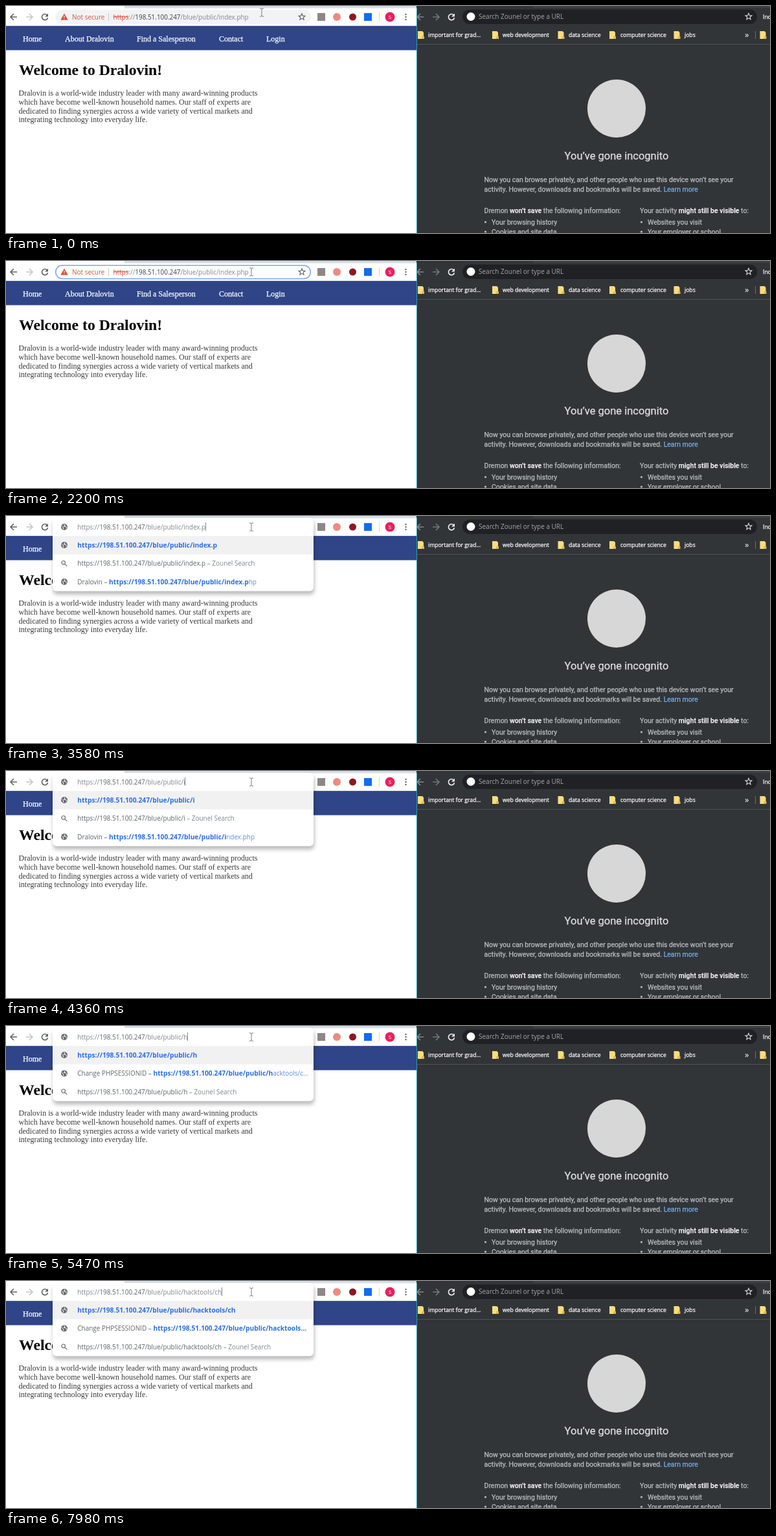
These frames come from a looping animation (1180x352 px, 8000 ms). An HTML page:

```html
<!DOCTYPE html>
<html lang="en">
<head>
<meta charset="utf-8">
<title>Two browser windows</title>
<style>
html, body { margin: 0; width: 100%; height: 100%; overflow: hidden; background: #fff; }
svg { display: block; width: 1180px; height: 352px; }
text { white-space: pre; stroke-width: 0; }
.ui { font-family: "Open Sans", "Noto Sans", sans-serif; }
.serif { font-family: "Liberation Serif", "Times New Roman", serif; }
.robo { font-family: Roboto, Arial, sans-serif; }
.firm { stroke-width: .25px; }
.line { fill: none; }
.panel { filter: drop-shadow(1.5px 5px 3px rgba(0, 0, 0, .28)); }
</style>
</head>
<body>
<svg id="stage" viewBox="0 0 1180 352"></svg>
<script>
const stage = document.getElementById('stage');
const LOOP = 8000;
const BRAND = 'Dralovin', ENGINE = 'Zounel', BROWSER = 'Dremon';
const HOST = '198.51.100.247', PATH = '/blue/public/';
const BASE = 'https://' + HOST + PATH;
const INK = '#3c4043', GREY = '#5f6368', PALE = '#80868b', RED = '#d9503f', BLUE = '#2b6fe6', SOFT = '#5a8ae6';

function add(parent, tag, attrs) {
  const el = document.createElementNS('http://www.w3.org/2000/svg', tag);
  for (const k in attrs) el.setAttribute(k, attrs[k]);
  return parent.appendChild(el);
}
const box = (p, x, y, width, height, fill, rx = 0) => add(p, 'rect', { x, y, width, height, fill, rx });
const dot = (p, cx, cy, r, fill) => add(p, 'circle', { cx, cy, r, fill });
const stroke = (p, x, y, d, color, width = 1.6) => add(p, 'path', {
  d, class: 'line', stroke: color, 'stroke-width': width, transform: `translate(${x} ${y})`
});

// parts: a string, or a list of [string, fill, extra attributes]
function label(p, cls, x, y, size, fill, parts) {
  const t = add(p, 'text', { class: cls, x, y, 'font-size': size, fill, stroke: fill });
  if (typeof parts === 'string') t.textContent = parts;
  else for (const [s, color, more] of parts) {
    add(t, 'tspan', { fill: color, stroke: color, ...more }).textContent = s;
  }
  return t;
}

const arrow = (x, dir, color) =>
  stroke(stage, x, 17, `M${-5 * dir} 0H${5 * dir}M0 -5L${-5 * dir} 0L0 5`, color);
function reload(x, color) {
  stroke(stage, x, 17, 'M3.4 -3A4.6 4.6 0 1 0 4.5 1.2', color);
  add(stage, 'path', { d: `M${x + 5} 11.5v5h-5z`, fill: color });
}
function star(p, x, y, color) {
  let d = '';
  for (let i = 0; i < 10; i++) {
    const r = i % 2 ? 2.3 : 5.2, a = i * Math.PI / 5 - Math.PI / 2;
    d += (i ? 'L' : 'M') + (r * Math.cos(a)).toFixed(2) + ' ' + (r * Math.sin(a)).toFixed(2);
  }
  stroke(p, x, y, d + 'Z', color, 1.1);
}
function globe(p, x, y) {
  dot(p, x, y, 5, '#6a6d71');
  stroke(p, x, y, 'M-4 -1.5l2.5 2.5v2.5M0 -4.2l1 1.7-2 1.5h3l2 2.5-1 1', '#fff', 1);
}
function lens(p, x, y) {
  stroke(p, x, y, 'M1.5 -1.2A2.8 2.8 0 1 1 -4.1 -1.2A2.8 2.8 0 1 1 1.5 -1.2M.8 .9L4.4 4.4', '#6a6d71', 1.2);
}

function drawSite() {
  box(stage, 0, 0, 634, 352, '#fff');
  box(stage, 183, 0, 451, 3.5, '#d5dfe5');
  arrow(12, 1, GREY);
  arrow(36, -1, '#c4c6c9');
  reload(60, GREY);
  box(stage, 481, 11, 12, 12, '#8d8787');
  dot(stage, 511, 17, 6, '#ee8a80');
  dot(stage, 535.5, 17, 5.5, '#8c1820');
  box(stage, 553, 11, 12, 12, '#0f6cf5');
  box(stage, 576, 10, 1, 14, '#d4d6d9');
  dot(stage, 593, 17, 7.5, '#e6215f');
  label(stage, 'ui', 593, 20, 8, '#fff', 'S').setAttribute('text-anchor', 'middle');
  for (const y of [13, 17, 21]) dot(stage, 617.5, y, 1.2, GREY);

  box(stage, 0, 30, 634, 1, '#dfe1e5');
  box(stage, 0, 31, 634, 37.5, '#2f4587');
  const nav = [[26, 'Home'], [91, 'About ' + BRAND], [202, 'Find a Salesperson'], [329, 'Contact'], [402, 'Login']];
  for (const [x, s] of nav) label(stage, 'serif firm', x, 55, 12, '#fff', s);
  label(stage, 'serif', 20, 107, 23.7, '#000', 'Welcome to ' + BRAND + '!').setAttribute('font-weight', 700);
  [BRAND + ' is a world-wide industry leader with many award-winning products',
    'which have become well-known household names. Our staff of experts are',
    'dedicated to finding synergies across a wide variety of vertical markets and',
    'integrating technology into everyday life.'
  ].forEach((s, i) => label(stage, 'serif', 19.5, 139.3 + i * 13.6, 12, '#3a3a3a', s));
}

function folder(x) {
  add(stage, 'path', { d: `M${x} 39h7l2 2v10h-9z`, fill: '#fbdc7c' });
  box(stage, x + 6, 47, 4, 4, '#e5b94d');
}

function drawPrivate() {
  box(stage, 634, 0, 546, 352, '#323538');
  box(stage, 814, 0, 366, 3, '#3c4043');
  box(stage, 634, 59, 546, 1, '#505357');
  arrow(640, 1, '#85888c');
  arrow(664, -1, '#74777b');
  reload(688, '#f1f3f4');
  box(stage, 705, 5.5, 455, 22.5, '#202124', 11.2);
  dot(stage, 718, 16.5, 6.5, '#fff');
  label(stage, 'ui', 730, 20.3, 10, '#a4a8ad', `Search ${ENGINE} or type a URL`);
  star(stage, 1147, 16.5, '#d5d7da');
  label(stage, 'ui firm', 1169, 20, 8.8, '#fff', 'Incognito');
  const marks = [[636, 652, 'important for grad...'], [751, 767, 'web development'], [852.5, 869, 'data science'],
    [932, 949, 'computer science'], [1031.5, 1048, 'jobs']];
  for (const [f, x, s] of marks) {
    folder(f);
    label(stage, 'ui firm', x, 48, 8.6, '#fff', s);
  }
  label(stage, 'ui', 1141, 49, 13, '#fff', '»');
  box(stage, 1157, 39, 1, 12, '#6a6d71');
  folder(1164.5);

  dot(stage, 943, 159, 45, '#d6d7d6');
  label(stage, 'robo firm', 943, 238, 16.5, '#dee0e3', 'You’ve gone incognito').setAttribute('text-anchor', 'middle');
  const dim = '#bdc1c6', lit = { 'font-weight': 500 };
  const note = (x, y, parts) => label(stage, 'robo firm', x, y, 10.5, dim, parts);
  note(738.5, 272.5, 'Now you can browse privately, and other people who use this device won’t see your');
  note(738.5, 287.5, [['activity. However, downloads and bookmarks will be saved. ', dim], ['Learn more', '#6fb1f7']]);
  note(738.5, 320.7, [[BROWSER + ' ', dim], ['won’t save', '#f1f3f4', lit], [' the following information:', dim]]);
  note(979, 320.7, [['Your activity ', dim], ['might still be visible', '#f1f3f4', lit], [' to:', dim]]);
  const items = [[750, 338.7, 'Your browsing history'], [750, 353.7, 'Cookies and site data'],
    [991, 338.7, 'Websites you visit'], [991, 353.7, 'Your employer or school']];
  for (const [x, y, s] of items) {
    dot(stage, x - 9.5, y - 3.7, 1.6, dim);
    note(x, y, s);
  }
  box(stage, 634, 3, 1, 349, '#23a0aa');
}

drawSite();
drawPrivate();
const bar = add(stage, 'g', {});
const beam = stroke(stage, 0, 0, 'M-3 -6.3Q0 -6.3 0 -5V5Q0 6.3 -3 6.3M3 -6.3Q0 -6.3 0 -5M0 5Q0 6.3 3 6.3', '#6b6e71', 0.9);

// Timed steps: the last entry already reached holds.
const pointer = [[0, 395, 10], [550, 387, 12.5], [700, 348, 18], [820, 329, 22.5], [970, 352, 20], [1090, 374, 17.5], [1240, 379, 17]];
const phases = [[0, 'idle'], [2200, 'focus'], [2320, 'select'], [2890, 'caret'], [3450, 'typing']];
const typing = [[0, 'index.php'], [3450, 'index.ph'], [3580, 'index.p'], [3700, 'index.'], [3840, 'index'], [3960, 'inde'],
  [4110, 'ind'], [4230, 'in'], [4360, 'i'], [4480, ''], [5470, 'h'], [5590, 'ha'], [5720, 'hack'], [6130, 'hackt'],
  [6250, 'hackto'], [6390, 'hacktool'], [6700, 'hacktools'], [7420, 'hacktools/'], [7850, 'hacktools/c'], [7980, 'hacktools/ch']];
const noCaret = [[5040, 5470], [6700, 6850]];

function at(list, t) {
  let hit = list[0];
  for (const step of list) if (step[0] <= t) hit = step;
  return hit;
}

function caretAfter(text, x) {
  box(bar, Math.floor(x + text.getComputedTextLength()), 10, 1, 13, '#84878a');
}

function drawPill(phase) {
  const on = phase !== 'idle', sel = phase === 'select';
  if (on) {
    const ring = box(bar, 76.7, 6.7, 393.6, 20.8, '#fff', 10.4);
    ring.setAttribute('stroke', '#7fa6ec');
    ring.setAttribute('stroke-width', 1.5);
  } else box(bar, 76, 6, 395, 22, '#f1f3f4', 11);
  add(bar, 'path', { d: 'M90 11.5l5.7 10.2H84.3z', fill: RED });
  box(bar, 89.5, 15, 1, 3.3, '#fff');
  box(bar, 89.5, 19.3, 1, 1.1, '#fff');
  label(bar, 'ui', 102, 20.6, 10, RED, 'Not secure');
  box(bar, 158, 11, 1, 12, '#c6c9cc');
  if (sel) box(bar, 165, 9, 212, 17, '#0078d7');
  const tone = c => sel ? '#fff' : c;
  const url = label(bar, 'ui', 165.5, 20.6, 9.92, INK, [
    ['https', tone(RED), { 'text-decoration': 'line-through' }], ['://', tone(PALE)],
    [HOST, tone(INK)], [PATH + 'index.php', tone(PALE)]]);
  star(bar, 457, 17, GREY);
  if (phase === 'caret') caretAfter(url, 165.5);
}

const bold = { 'font-weight': 700, 'font-size': 10.25 };

function suggestions(typed) {
  const own = [globe, [[BASE + typed, BLUE, bold]]];
  const search = [lens, [[BASE + typed, GREY], [` – ${ENGINE} Search`, PALE]]];
  const page = (title, rest) => [globe, [[title + ' – ', GREY], [BASE + typed, BLUE, bold], [rest, SOFT]]];
  if (typed === '') {
    return [own, search, page(BRAND, 'index.php'), page('Change PHPSESSIONID', 'hacktools/c…'), page(BRAND, 'login.php')];
  }
  if (typed[0] === 'i') return [own, search, page(BRAND, 'index.php'.slice(typed.length))];
  const n = typed.length, tool = 'hacktools';
  const hit = n > tool.length
    ? [globe, [['Change PHPSESSIONID – ', GREY], [BASE + tool + '…', BLUE, bold]]]
    : page('Change PHPSESSIONID', (tool + (n < 5 ? '/c…' : '/…')).slice(n));
  return [own, hit, search];
}

function drawPanel(typed, caret) {
  const rows = suggestions(typed), step = 28.5;
  box(bar, 72, 3, 403, 28 + rows.length * step, '#fff', 6).setAttribute('class', 'panel');
  box(bar, 72, 31, 403, step, '#f1f1f2');
  globe(bar, 90, 17);
  const url = label(bar, 'ui', 110.3, 20.6, 9.96, GREY, [['https://', PALE], [HOST, GREY], [PATH + typed, PALE]]);
  rows.forEach(([icon, parts], i) => {
    const y = 45 + i * step;
    icon(bar, 90, y);
    label(bar, 'ui', 110.3, y + 3.7, 9.96, GREY, parts);
  });
  if (caret) caretAfter(url, 110.3);
}

let shown = '';
function frame() {
  const t = performance.now() % LOOP;
  const [, x, y] = at(pointer, t);
  beam.setAttribute('transform', `translate(${x} ${y})`);
  const phase = at(phases, t)[1], typed = at(typing, t)[1];
  const caret = !noCaret.some(([a, b]) => t >= a && t < b);
  const key = [phase, typed, caret].join('|');
  if (key !== shown) {
    shown = key;
    bar.replaceChildren();
    if (phase === 'typing') drawPanel(typed, caret);
    else drawPill(phase);
  }
  requestAnimationFrame(frame);
}
frame();
</script>
</body>
</html>
```
